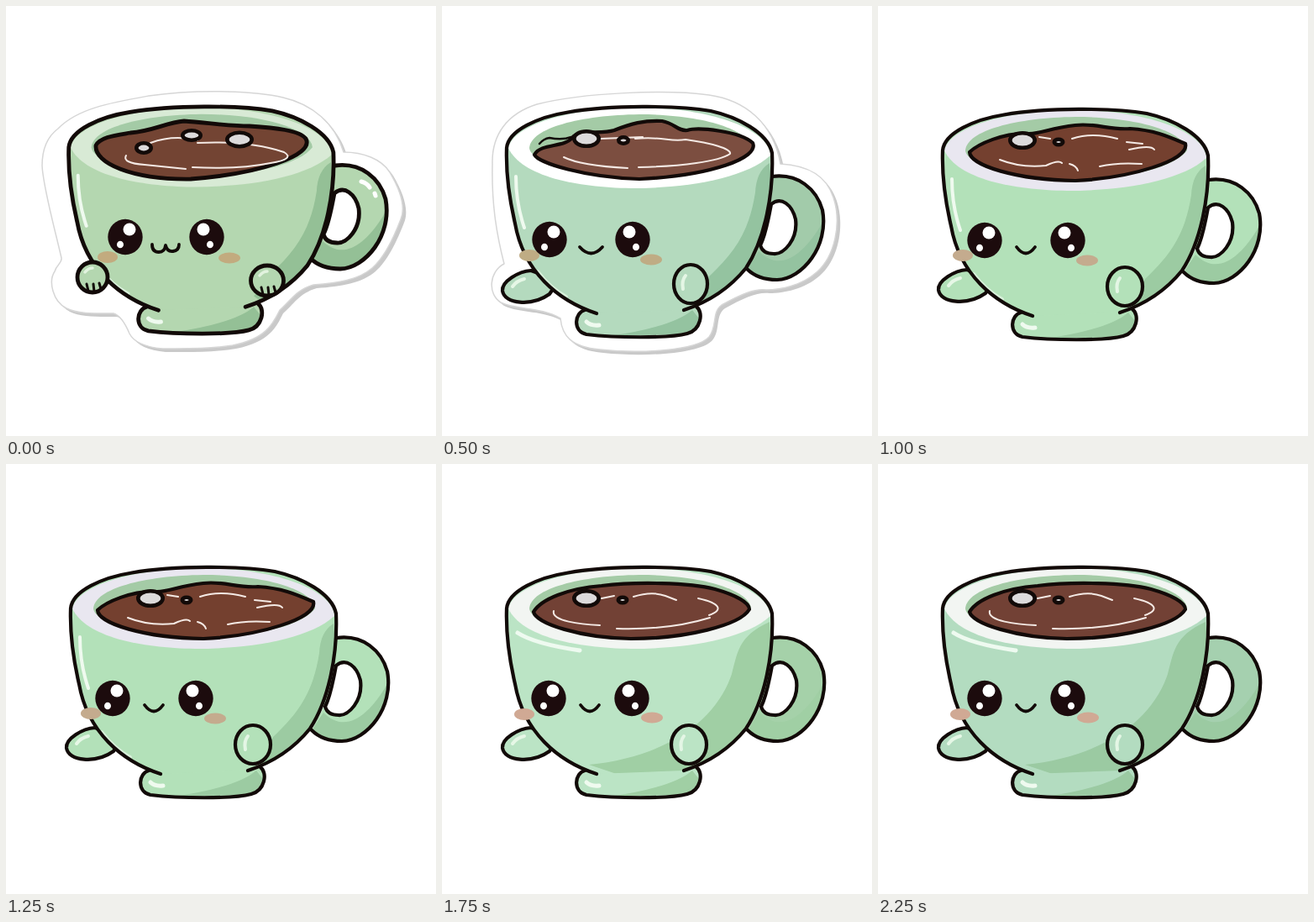
An HTML page that plays this animation: 512x512 px, repeating every 2500 ms.

```html
<!DOCTYPE html>
<html lang="en">
<head>
<meta charset="utf-8">
<title>Cocoa cup</title>
<style>
  html, body { margin: 0; width: 100%; height: 100%; overflow: hidden; background: #fff; }
  svg { display: block; width: 100vw; height: 100vh; }
</style>
</head>
<body>
<svg viewBox="0 0 512 512" stroke-linecap="round" stroke-linejoin="round">
  <defs><clipPath id="bowl"><path id="bowlShape"/></clipPath></defs>
  <g id="stage"></g>
</svg>
<script>
const INK = '#120a08';
const BOWL = 'M184 369C138 354 97 319 87 262C80 232 76 200 77 172C79 151 115 135 150 129.5C200 121 280 121 320 128C352 135 388 154 393 178C395 225 385 280 362 315C345 336 322 354 288 365';
const FOOT = 'M170 365C158 368 155 390 172 394C205 398 270 399 292 393C308 389 312 368 303 361';
const RIM = 'M79 172C85 145 150 124 235 124C320 124 390 150 391 181C360 209 290 220 225 220C160 219 95 206 79 172Z';
const WALL = 'M104 172C106 148 165 133 235 132C310 132 366 150 368 172C350 195 290 206 235 206C160 204 106 190 104 172Z';
const HANDLE = 'M394 207C425 203 447 222 454 247C462 290 430 329 400 330C385 330 372 325 364 317';
const HOLE = 'M393 240C405 230 418 241 422 258C425 282 408 300 396 299C388 299 382 296 380 289C387 275 390 255 393 240Z';

const STICKERS = {
  round: 'M62 146C85 122 125 115 170 107C235 98 300 102 330 109C365 117 392 140 402 174C425 174 447 182 457 198C470 220 476 240 470 254C462 275 450 300 436 312C420 326 395 330 366 332C345 338 338 352 326 362C318 378 310 396 270 404C240 409 210 408 186 408C165 406 152 400 147 390C142 378 135 368 128 366C110 366 85 367 72 360C56 352 50 328 58 316C60 308 67 306 66 300C58 265 44 215 43 190C43 170 50 155 62 146Z',
  wide: 'M62 190C61 155 80 130 115 119C170 105 270 101 320 108C362 114 396 140 405 190C440 192 460 205 468 230C478 260 470 300 448 319C430 335 405 340 388 340C375 338 358 345 335 358C323 366 330 384 320 396C305 413 235 416 190 411C155 408 145 394 143 374C120 360 90 364 72 355C56 345 58 318 76 309C66 270 61 235 62 190Z'
};

const COFFEE = {
  full: 'M107 166C112 156 130 154 148 151C175 149 190 139 212 137C240 139 265 143 290 143C320 145 350 148 357 158C368 178 300 200 220 206C150 207 105 187 107 166Z',
  low: 'M110 180C118 166 145 172 155 160C162 150 190 156 205 151C225 143 240 139 262 140C278 143 280 152 292 151C305 147 355 152 370 166C378 184 320 205 235 209C170 207 115 190 110 180Z',
  wavy: 'M109 174C118 165 150 150 180 152C195 152 205 145 235 142C260 139 275 148 300 146C330 148 345 155 366 164C371 184 300 205 235 208C165 207 110 190 109 174Z',
  calm: 'M109 176C118 161 150 148 190 145C230 140 295 141 325 149C350 156 366 165 366 173C355 192 290 208 225 208C165 207 112 190 109 176Z'
};
const SWIRLS = {
  full: 'M143 178Q138 187 165 189L214 194M172 163Q200 153 228 160M228 163Q290 160 331 174Q345 182 315 187Q275 195 222 192',
  low: 'M145 183Q165 193 221 196M189 161L239 159M230 161C265 158 270 165 290 162C320 166 345 173 343 179C330 188 285 194 234 195',
  wavy: 'M145 183Q170 193 200 190Q215 183 219 187M192 156L205 158M231 158Q255 150 285 158M296 162L315 164M228 188Q236 190 238 196M264 191Q285 186 314 188M299 171Q325 165 329 171',
  calm: 'M133 175C130 187 165 191 188 192M208 196Q270 198 319 183M305 160C332 166 335 174 318 180M190 160L205 157M228 158Q250 151 266 157L279 162'
};

const base = {
  body: 'translate(0 0)', handle: 'translate(0 0)', fill: '#b9dfc1', shade: '#9ccba2', wall: '#a4cba6',
  rim: '#e7e7ee', coffee: 'low', drift: [0, 0], cocoa: '#794c3f', line: 4.2,
  bubbles: [[172, 163, 17, 11], [217, 164, 7.5, 5.5]],
  eyes: [127, 226, 280], smile: [164, 187, 290], blush: [103, 302, 247, 308], blushColor: '#c6b088',
  paw: [294, 337, 21, 23, 0], arm: [0, 0]
};
const foam = { ...base, fill: '#b3e1b9', rim: '#e9e7f0', coffee: 'wavy', cocoa: '#74402f',
  bubbles: [[172, 160, 17, 11], [215, 162, 7.5, 5.5]], eyes: [127, 226, 279], smile: [165, 187, 287],
  blush: [101, 297, 249, 303], blushColor: '#c4ab8e', paw: [294, 334, 21, 23, 0], arm: [-1, -4] };
const calm = { ...foam, fill: '#bbe4c5', grip: '#a5d1a9', shade: '#a0cfa4', rim: '#f2f5f2',
  coffee: 'calm', cocoa: '#724135', blush: [98, 298, 250, 302], blushColor: '#d0a994', soft: true };
const dusk = { ...calm, fill: '#b3dcc0', grip: '#a5d0af', shade: '#9bcaa2' };

const poses = [
  { ...base, body: 'translate(-2 -1.2) scale(.997 .985)', handle: 'translate(-2 -17)', fill: '#b4d7b0',
    shade: '#94c096', rim: '#d8ead5', coffee: 'full', cocoa: '#734433', sticker: 'round', shine: true,
    line: 4.8, bubbles: [[164, 169, 11, 8], [221, 154, 13, 8], [278, 159, 17, 10.5]], eyes: [142, 239, 275],
    blush: [121, 299, 266, 300], blushColor: '#c2ab7f', toes: true },
  { ...base, body: 'translate(4.4 5) scale(.995 .975)', handle: 'translate(0 -6)', fill: '#b9e0c0',
    rim: '#fff', drift: [2, -5], sticker: 'wide', shine: true,
    bubbles: [[173, 158, 17, 11], [217, 160, 8, 6]], eyes: [133, 230, 278], smile: [171, 195, 288],
    blush: [114, 298, 257, 303], paw: [291, 339, 18, 23, 40], arm: [0, -4] },
  { ...base, body: 'translate(0 -3)', handle: 'translate(-1 -4)', fill: '#b4dabe', grip: '#a2cbaa',
    shade: '#94c3a0', rim: '#fff', drift: [0, -3], cocoa: '#7c4e40', sticker: 'wide', shift: [-2, -2],
    bubbles: [[172, 158, 17, 11], [216, 160, 8, 6]], eyes: [128, 227, 278], smile: [164, 191, 287],
    blush: [104, 297, 249, 302], blushColor: '#bfac84', paw: [296, 331, 20, 23, 0], arm: [-1, -3] },
  base, foam, foam, calm, calm, dusk, dusk
];

const path = (d, fill, stroke = 'none', width = 0, more = '') =>
  `<path d="${d}" fill="${fill}" stroke="${stroke}" stroke-width="${width}" ${more}/>`;
const oval = (x, y, rx, ry, fill, more = '') =>
  `<ellipse cx="${x}" cy="${y}" rx="${rx}" ry="${ry}" fill="${fill}" ${more}/>`;
const group = (move, inner) => `<g transform="${move}">${inner}</g>`;
const shift = ([x, y]) => `translate(${x} ${y})`;
const inked = w => `stroke="${INK}" stroke-width="${w}"`;

function sticker(p) {
  if (!p.sticker) return '';
  const d = STICKERS[p.sticker];
  return group(shift(p.shift || [0, 0]),
    path(d, '#c9c9c9', 'none', 0, 'transform="translate(4 4)"') + path(d, '#fff', '#d6d6d6', 1.5));
}

function handle(p) {
  return group(p.handle,
    path(HANDLE + 'L378 290L390 220Z', p.grip || p.fill) +
    path('M454 262C450 305 420 330 400 330C385 330 372 325 364 317L378 296C404 322 432 300 454 262Z', p.shade) +
    path(HANDLE, 'none', INK, p.line) + path(HOLE, '#fff', INK, p.line) +
    (p.shine ? path('M425 226Q432 228 435 233M441 240L442 243', 'none', '#fff', 5) : ''));
}

function cup(p) {
  const shade = p.soft
    ? 'M390 188C352 205 352 225 345 250C325 310 260 350 175 358L300 400L400 300Z'
    : 'M390 190Q374 200 373 225C366 270 350 295 318 325L298 352L330 375L400 300Z';
  const gloss = p.soft
    ? path('M90 201Q110 214 164 222', 'none', '#eefaf0', 5)
    : path('M88 206Q88 238 98 267', 'none', '#effaef', 4) +
      path('M114 319Q129 339 148 349', 'none', '#d8f0da', 4);
  return group(p.body,
    path(FOOT, p.fill) + path('M200 396Q275 385 298 365L306 375Q302 394 275 394Z', p.shade) +
    path(BOWL + 'Z', p.fill) +
    `<g clip-path="url(#bowl)">${path(shade, p.shade)}${gloss}${path(RIM, p.rim)}${path(WALL, p.wall)}</g>` +
    path('M172 379Q177 384 187 383', 'none', '#effaef', 5) +
    path(FOOT, 'none', INK, p.line) + path(BOWL, 'none', INK, p.line));
}

function drink(p) {
  const ledge = p.coffee === 'low' ? path('M116 167Q121 161 128 160Q143 163 154 159', 'none', INK, 2.5) : '';
  return group(shift(p.drift), path(COFFEE[p.coffee], p.cocoa, INK, p.line) + ledge +
      path(SWIRLS[p.coffee], 'none', '#f4e9e4', 2)) +
    p.bubbles.map(([x, y, rx, ry]) => oval(x, y, rx - 2.3, ry - 2.3, '#dcdadb', inked(4.6))).join('');
}

function face(p) {
  const [left, right, y] = p.eyes, [a, b, m] = p.smile, [bx, by, cx, cy] = p.blush;
  const eye = (x, big, small) => oval(x, y, 20.7, 21.2, '#1c0b0d') +
    oval(x + big, y - 9, 7.5, 7.5, '#fff') + oval(x + small, y + 9, 4, 4.3, '#fff');
  const mouth = p.toes
    ? 'M174 284Q174 293 182 293Q189 293 190 285Q192 293 199 292Q206 291 206 284'
    : `M${a} ${m}Q${(a + b) / 2} ${m + 15} ${b} ${m}`;
  return oval(bx, by, 12, 7, p.blushColor) + oval(cx, cy, 13, 6.5, p.blushColor) +
    eye(left, 5, -6) + eye(right, -4, 4) + path(mouth, 'none', INK, 3.8);
}

function arm(p) {
  return group(shift(p.arm),
    path('M107 318C92 319 72 331 73 342C75 358 108 361 129 346L140 330Z', p.fill, INK, p.line) +
    path('M85 337Q90 330 99 328', 'none', '#e6f7e6', 4));
}

function paw(p) {
  if (p.toes) {
    const round = (x, y, w) => oval(x, y, w, 18, p.fill, inked(p.line)) +
      path(`M${x - 7} ${y + 8}l2 8m6 -8l1 9m6 -10l2 7`, 'none', INK, 3) +
      path(`M${x - 9} ${y - 6}q4 -5 9 -5`, 'none', '#e2f3df', 3.5);
    return round(103, 323, 18) + round(311, 327, 19.5);
  }
  const [x, y, rx, ry, turn] = p.paw;
  return oval(x, y, rx, ry, p.fill, `${inked(p.line)} transform="rotate(${turn} ${x} ${y})"`) +
    path(`M${x - 9} ${y + 6}Q${x - 11} ${y - 4} ${x - 6} ${y - 10}`, 'none', '#e4f6e5', 4);
}

const stage = document.getElementById('stage');
document.getElementById('bowlShape').setAttribute('d', BOWL + 'Z');
const pictures = poses.map(p =>
  sticker(p) + handle(p) + (p.toes ? '' : arm(p)) + cup(p) + drink(p) + face(p) + paw(p));

let shown = -1;
function draw(now) {
  const index = Math.floor(now % 2500 / 250);
  if (index !== shown) stage.innerHTML = pictures[shown = index];
  requestAnimationFrame(draw);
}
draw(performance.now());
</script>
</body>
</html>
```
